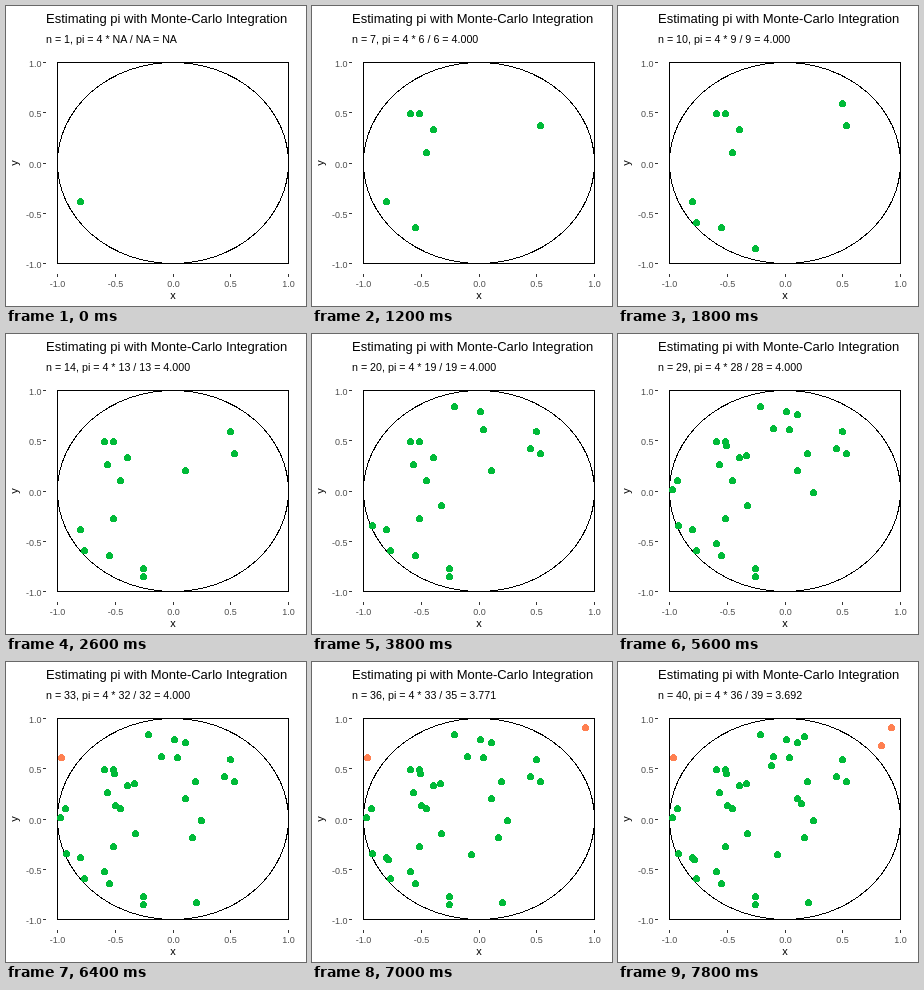
An HTML page for the animation above (8000 ms loop, 300 px wide and 300 px high).

```html
<!DOCTYPE html>
<html lang="en">
<head>
<meta charset="utf-8">
<title>Estimating pi</title>
<style>
  html, body { margin: 0; width: 100%; height: 100%; overflow: hidden; background: #fff; }
  svg { display: block; width: 100%; height: 100%; font-family: "Liberation Sans", Arial, sans-serif; }
  .shape { fill: none; stroke: #000; shape-rendering: crispEdges; }
  .tick { stroke: #333; shape-rendering: crispEdges; }
  .tickLabel { font-size: 9px; fill: #4d4d4d; }
  .axis { font-size: 11px; text-anchor: middle; }
  #points { shape-rendering: crispEdges; }
</style>
</head>
<body>
<svg viewBox="0 0 300 300">
  <text x="40" y="17" font-size="13">Estimating pi with Monte-Carlo Integration</text>
  <text id="estimate" x="40" y="37" font-size="10.7"></text>
  <g id="axes"></g>
  <text class="axis" x="167" y="293">x</text>
  <text class="axis" transform="translate(12 157) rotate(-90)">y</text>
  <rect class="shape" x="51.5" y="56.5" width="231" height="201"/>
  <ellipse class="shape" cx="167" cy="157" rx="115.5" ry="100.5"/>
  <g id="points"></g>
</svg>
<script>
const STEP = 200;
const center = { x: 167, y: 157 }, radius = { x: 115.5, y: 100.5 };

// Sample positions in the order they are drawn.
const samples = [
  [74, 195], [98, 107], [121, 123], [228, 119], [114, 146], [103, 221], [107, 107],
  [224, 97], [137, 242], [78, 216], [101, 130], [137, 234], [179, 136], [107, 184],
  [142, 72], [60, 191], [168, 77], [218, 114], [171, 95], [129, 171],
  [54, 155], [195, 158], [155, 94], [108, 111], [179, 80],
  [59, 146], [98, 209], [189, 119], [128, 121],
  [109, 143], [186, 175], [190, 240], [55, 95],
  [273, 65], [159, 192], [76, 197], [153, 103], [263, 83], [183, 141], [186, 74]
];

function add(parent, name, attributes, text = "") {
  const node = document.createElementNS("http://www.w3.org/2000/svg", name);
  for (const key in attributes) node.setAttribute(key, attributes[key]);
  node.textContent = text;
  return parent.appendChild(node);
}

const axes = document.getElementById("axes");
for (const value of [-1, -0.5, 0, 0.5, 1]) {
  const x = Math.floor(center.x + value * radius.x) + 0.5;
  const y = Math.floor(center.y - value * radius.y) + 0.5;
  const label = value.toFixed(1);
  add(axes, "line", { class: "tick", x1: 37, x2: 40, y1: y, y2: y });
  add(axes, "line", { class: "tick", x1: x, x2: x, y1: 268, y2: 271 });
  add(axes, "text", { class: "tickLabel", x: 35.5, y: y + 4, "text-anchor": "end" }, label);
  add(axes, "text", { class: "tickLabel", x, y: 281, "text-anchor": "middle" }, label);
}

const group = document.getElementById("points");
const insideCounts = [0];
const dots = samples.map(([x, y], i) => {
  const inside = Math.hypot((x - center.x) / radius.x, (y - center.y) / radius.y) <= 1;
  insideCounts.push(insideCounts[i] + inside);
  return add(group, "circle", {
    cx: x + 0.5, cy: y + 0.5, r: 3.5, fill: inside ? "#00ba38" : "#ff7f50"
  });
});

const estimate = document.getElementById("estimate");
let shown = 0;

function show(n) {
  if (n === shown) return;
  shown = n;
  dots.forEach((dot, i) => dot.style.display = i < n ? "" : "none");
  // The estimate covers the samples before the newest one.
  const total = n - 1, inside = insideCounts[total];
  const result = total
    ? `${inside} / ${total} = ${(4 * inside / total).toFixed(3)}`
    : "NA / NA = NA";
  estimate.textContent = `n = ${n}, pi = 4 * ${result}`;
}

const start = performance.now();
function tick() {
  const elapsed = performance.now() - start;
  show(Math.floor(elapsed / STEP) % samples.length + 1);
  requestAnimationFrame(tick);
}
show(1);
requestAnimationFrame(tick);
</script>
</body>
</html>
```
